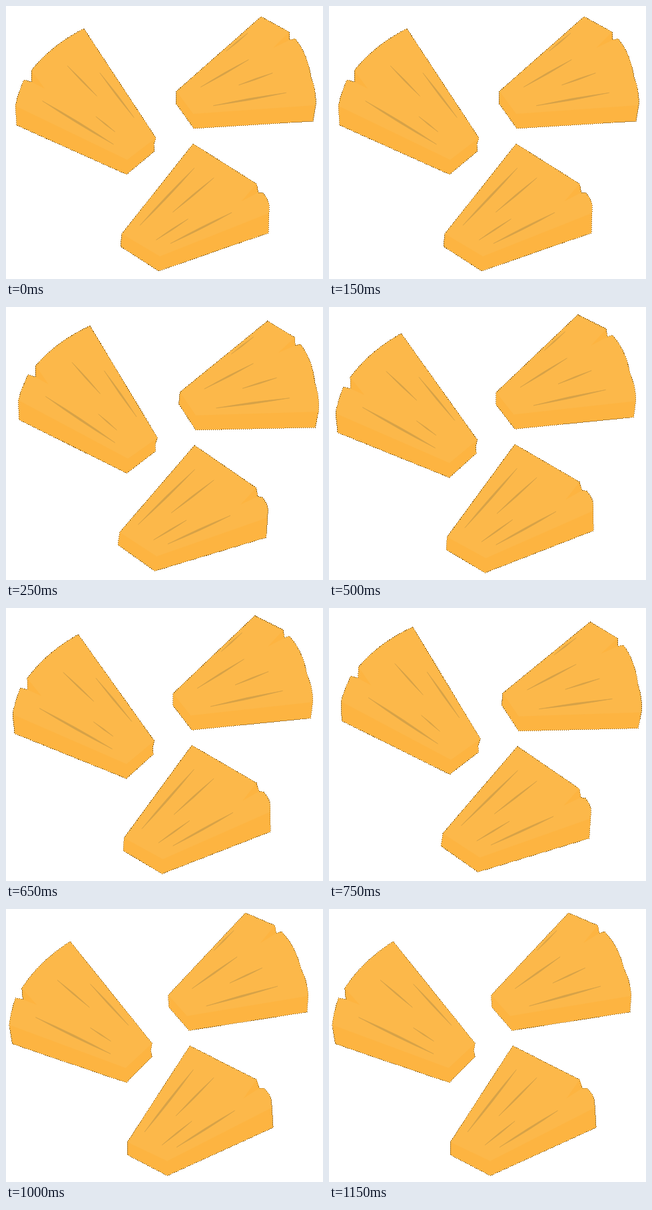
Write an HTML page that moves like this. It is 476x410 px and loops after 1.25 s.

```html
<!DOCTYPE html>
<html lang="en">
<head>
<meta charset="utf-8">
<title>Pineapple chunks</title>
<style>
  html, body { margin: 0; width: 100%; height: 100%; overflow: hidden; background: #fff; }
  svg { display: block; }
  .face { fill: #fcb84a; }
  .side { fill: #fdb441; }
  .mark { fill: #d6a248; stroke: #d6a248; stroke-width: .6; }
  .edge { fill: none; stroke: #8a5c12; stroke-dasharray: 1.5; shape-rendering: crispEdges; }
</style>
</head>
<body>
<svg width="476" height="410"><g id="chunks"></g></svg>
<script>
const STEP = 250;
const ANGLES = [0, 2.3, -2.2, 2.2, -5.4];
const PIVOT = '263 259';
const LAST_LANE = .82;

// The face runs back -> rim -> lip -> front -> tip; base is the lower silhouette.
// Each span is how far a mark reaches along its lane, from tip (0) to rim (1).
const CHUNKS = [
  {
    back: [117, 34], lip: [14, 150], front: [182, 231], tip: [225, 198],
    rim: 'Q68 59 38 97V114L27 111Q17 135',
    base: '16 179 181 253 223 218 222 209',
    notch: 'M38 97V114L58 124Z',
    lane: .14, spans: [[.23, .67], [.56, .9], [.25, .45], [.18, .86]]
  },
  {
    back: [383, 16], lip: [465, 149], front: [281, 162], tip: [256, 128],
    rim: 'L425 39L426 51L434 49Q453 72 458 107Q466 127',
    base: '461 173 282 184 255 146',
    notch: 'M425 39L426 51L401 63Z',
    lane: .04, spans: [[.57, .82], [.2, .7], [.5, .82], [.2, .83]]
  },
  {
    back: [281, 207], lip: [395, 311], front: [231, 376], tip: [174, 342],
    rim: 'L376 267L379 280L386 281Q396 293 395 302L',
    base: '394 341 229 398 172 361',
    notch: 'M376 267L379 280L354 293Z',
    lane: .17, spans: [[.15, .85], [.42, .9], [.12, .46], [.17, .77]]
  }
];

const lerp = (a, b, t) => a.map((v, i) => v + (b[i] - v) * t);
const path = (cls, d) => `<path class="${cls}" d="${d}"/>`;

// A streak that tapers to a point at both ends
function streak([x1, y1], [x2, y2]) {
  const dx = x2 - x1, dy = y2 - y1, len = Math.hypot(dx, dy);
  const width = 1 + len * .015;
  const ctrl = w => `${(x1 + x2) / 2 - dy / len * w} ${(y1 + y2) / 2 + dx / len * w}`;
  return `M${x1} ${y1}Q${ctrl(width)} ${x2} ${y2}Q${ctrl(-width)} ${x1} ${y1}Z`;
}

// Lanes spread evenly across the face and fan out towards the rim
function marks({ back, lip, front, tip, lane, spans }) {
  return spans.map(([from, to], i) => {
    const across = lane + (LAST_LANE - lane) * i / (spans.length - 1);
    const near = lerp(tip, front, across), far = lerp(back, lip, across);
    return streak(lerp(near, far, from), lerp(near, far, to));
  }).join('');
}

function chunk(c) {
  const top = `M${c.back}${c.rim} ${c.lip}L`;
  const outline = `${top}${c.base} ${c.tip}Z`;
  return path('side', outline) + path('face', `${top}${c.front} ${c.tip}Z`) +
    path('side', c.notch) + path('mark', marks(c)) + path('edge', outline);
}

const group = document.getElementById('chunks');
group.innerHTML = CHUNKS.map(chunk).join('');

function draw() {
  const angle = ANGLES[Math.floor(performance.now() / STEP) % ANGLES.length];
  group.setAttribute('transform', `rotate(${angle} ${PIVOT})`);
  requestAnimationFrame(draw);
}
draw();
</script>
</body>
</html>
```
